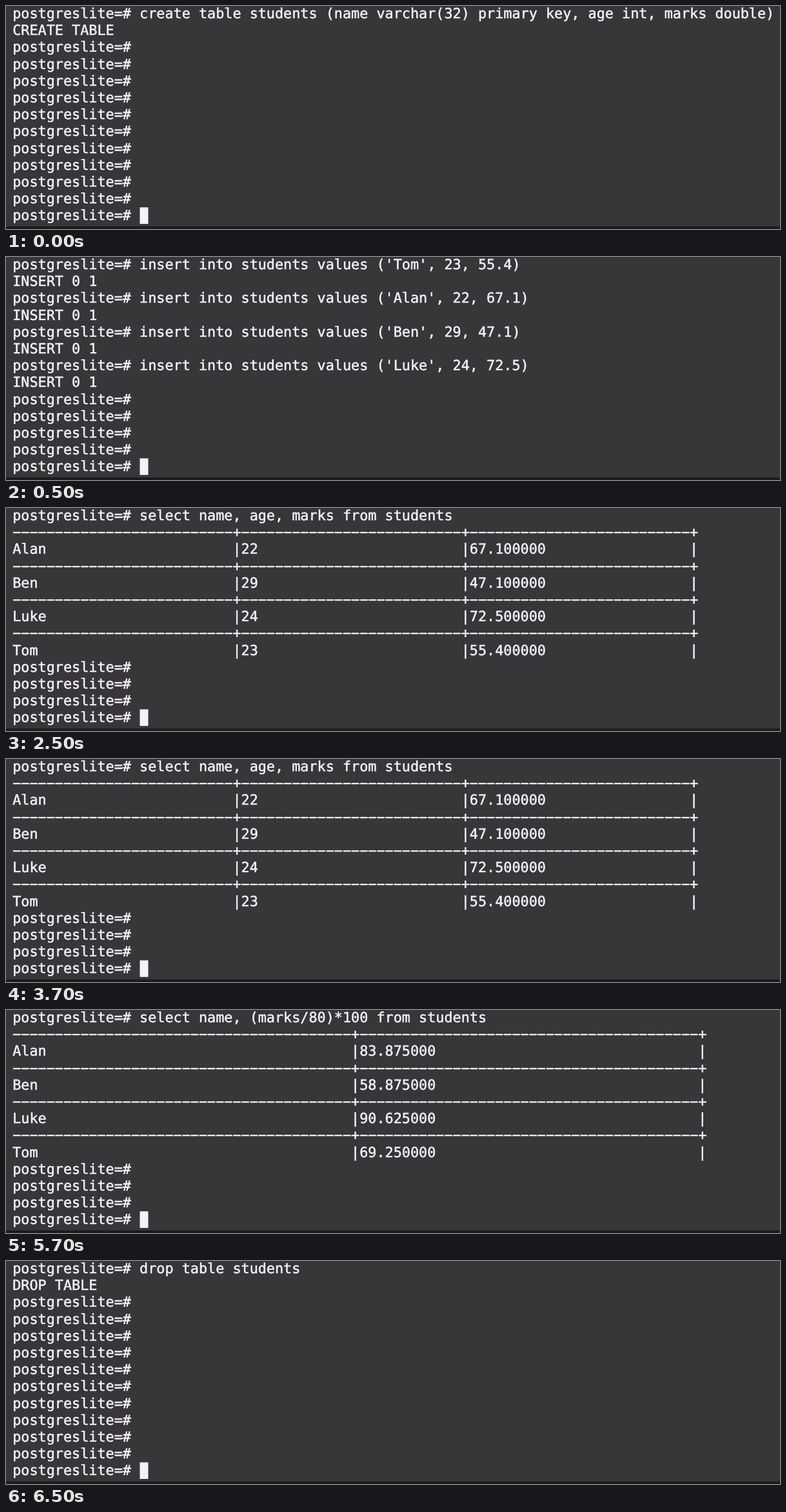
Animation, 1200 px wide and 347 px high, one loop 8000 ms. Source, as an HTML page:

```html
<!DOCTYPE html>
<html lang="en">
<head>
<meta charset="utf-8">
<title>Terminal session</title>
<style>
  html, body { margin: 0; width: 100%; height: 100%; overflow: hidden; background: #373638; }
  svg { display: block; width: 100vw; height: 100vh; }
  text {
    font: 21.8px "DejaVu Sans Mono", Menlo, monospace;
    fill: #f7f1fe;
    stroke: #f7f1fe;
    stroke-width: 0.5px;
    white-space: pre;
    text-rendering: geometricPrecision;
  }
</style>
</head>
<body>
<svg viewBox="0 0 1200 347">
  <rect width="1200" height="347" fill="#373638"/>
  <rect y="343" width="1200" height="4" fill="#1b1b1c"/>
  <g id="lines"></g>
  <rect x="207.5" y="313.3" width="13" height="25.8" fill="#f7f1fe"/>
</svg>
<script>
const ROWS = 13, LEFT = 10.2, BASELINE = 19, LINE_HEIGHT = 26.2, LOOP = 8000;
const PROMPT = 'postgreslite=# ';

const students = [
  { name: 'Tom', age: 23, marks: 55.4 },
  { name: 'Alan', age: 22, marks: 67.1 },
  { name: 'Ben', age: 29, marks: 47.1 },
  { name: 'Luke', age: 24, marks: 72.5 },
];
const sorted = [...students].sort((a, b) => a.name < b.name ? -1 : 1);

const command = (sql, ...output) => [PROMPT + sql, ...output];

// Result rows, each under a ruled line; the first cell has no left border.
function table(width, toCells) {
  return sorted.flatMap(student => {
    const cells = toCells(student);
    return [
      cells.map(() => '\u2212'.repeat(width) + '+').join(''),
      cells.map(cell => String(cell).padEnd(width) + '|').join(''),
    ];
  });
}

const screens = [
  { start: 0, lines: command(
    'create table students (name varchar(32) primary key, age int, marks double)', 'CREATE TABLE') },
  { start: 500, lines: students.flatMap(s => command(
    `insert into students values ('${s.name}', ${s.age}, ${s.marks})`, 'INSERT 0 1')) },
  { start: 2500, lines: command('select name, age, marks from students',
    ...table(26, s => [s.name, s.age, s.marks.toFixed(6)])) },
  { start: 4500, lines: command('select name, (marks/80)*100 from students',
    ...table(40, s => [s.name, (s.marks / 80 * 100).toFixed(6)])) },
  { start: 6500, lines: command('drop table students', 'DROP TABLE') },
];

const rows = Array.from({ length: ROWS }, (_, i) => {
  const row = document.createElementNS('http://www.w3.org/2000/svg', 'text');
  row.setAttribute('x', LEFT);
  row.setAttribute('y', BASELINE + i * LINE_HEIGHT);
  return document.getElementById('lines').appendChild(row);
});

let shown;
function render(time) {
  const screen = screens.findLast(s => s.start <= time % LOOP);
  if (screen === shown) return;
  shown = screen;
  rows.forEach((row, i) => { row.textContent = screen.lines[i] ?? PROMPT; });
}

const origin = performance.now();
function tick() {
  render(performance.now() - origin);
  requestAnimationFrame(tick);
}
tick();
</script>
</body>
</html>
```
